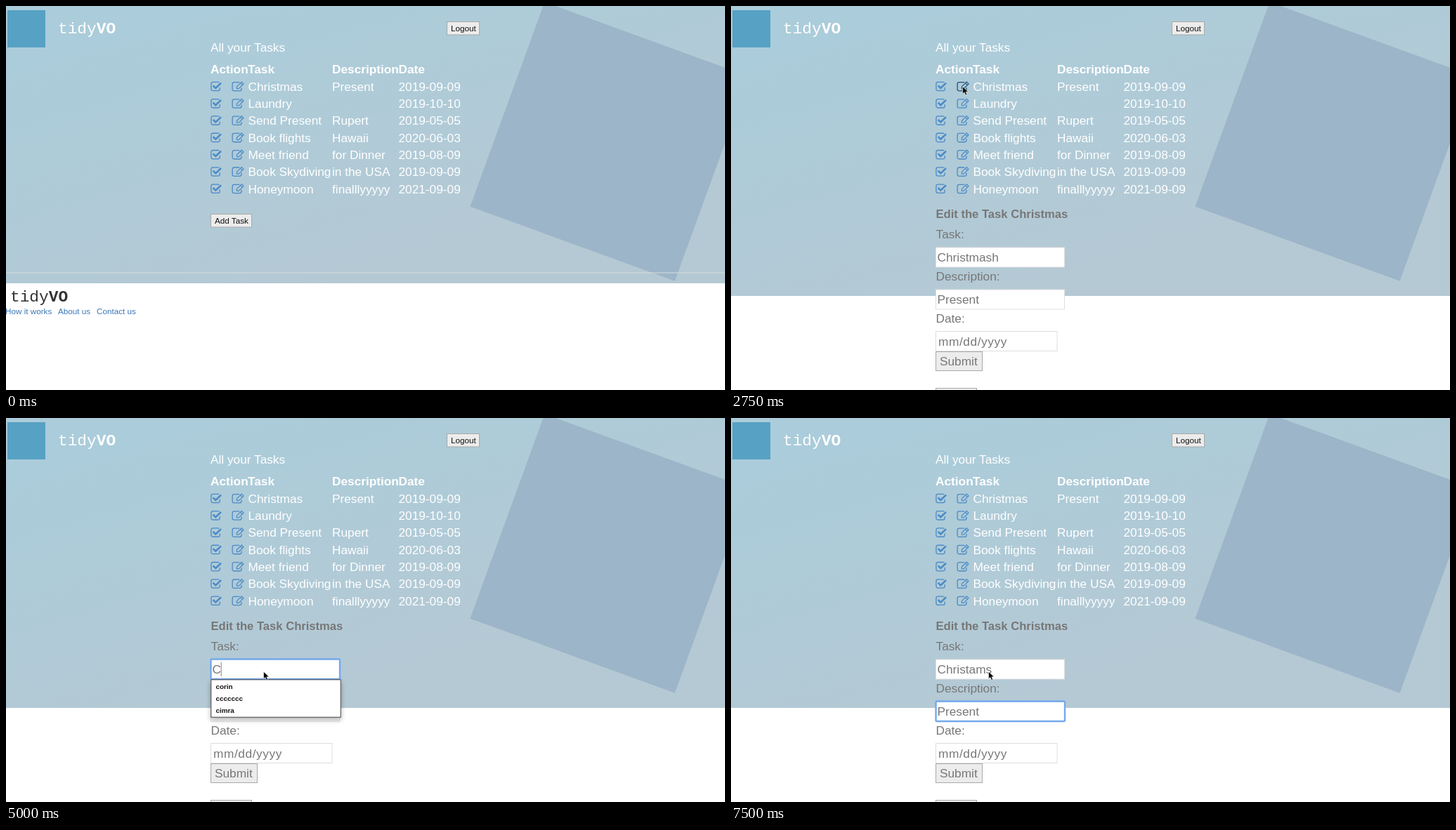
Write an HTML page that moves like this. It is 1023x547 px and loops after 8 s.

```html
<!DOCTYPE html>
<html lang="en">
<head>
<meta charset="utf-8">
<title>Task list</title>
<style>
html, body { margin: 0; width: 100%; height: 100%; overflow: hidden; background: #fff; }
svg { display: block; width: 100%; height: 100%; }
text { font: 17.25px "Liberation Sans", Arial, sans-serif; white-space: pre; }
.b { font-weight: bold; }
.brand { font: 22.8px "Liberation Mono", "Courier New", monospace; }
.small { font-size: 11.7px; }
.item { font-size: 9.9px; font-weight: bold; }
</style>
</head>
<body>
<svg id="stage" viewBox="0 0 1023 547" preserveAspectRatio="none">
  <defs>
    <linearGradient id="sky" gradientUnits="userSpaceOnUse" x1="330" y1="0" x2="450" y2="413">
      <stop offset="0" stop-color="#abccda"/>
      <stop offset="1" stop-color="#b5c9d4"/>
    </linearGradient>
    <filter id="shade" x="-10%" y="-20%" width="120%" height="150%">
      <feDropShadow dx="0" dy="3" stdDeviation="3.5" flood-opacity=".32"/>
    </filter>
  </defs>
</svg>
<script>
const NS = 'http://www.w3.org/2000/svg';
const LOOP = 8000;
const GRAY = '#777', LINK = '#3b78b8', ICON = '#4a8ac6', ICON_HOVER = '#23527c';
const stage = document.getElementById('stage');

function add(parent, tag, attrs = {}, content) {
  const el = document.createElementNS(NS, tag);
  for (const key in attrs) el.setAttribute(key, attrs[key]);
  if (content !== undefined) el.textContent = content;
  parent.appendChild(el);
  return el;
}
const label = (parent, x, y, s, fill = '#fff', cls = '') =>
  add(parent, 'text', { x, y, fill, class: cls }, s);
const box = (parent, x, y, width, height, fill, extra = {}) =>
  add(parent, 'rect', { x, y, width, height, fill, ...extra });
const show = (el, on) => el.setAttribute('visibility', on ? 'visible' : 'hidden');

function button(parent, x, y, w, h, s, fill = '#111', cls = 'small', dx = 5.5, dy = 13.4) {
  box(parent, x, y, w, h, '#ececec', { stroke: '#a9a9a9' });
  label(parent, x + dx, y + dy, s, fill, cls);
}

function brand(parent, x, y, fill) {
  const t = label(parent, x, y, 'tidy', fill, 'brand');
  add(t, 'tspan', { 'font-weight': 'bold' }, 'VO');
}

function field(parent, y, w) {
  box(parent, 291.5, y, w, 28, '#fff', { stroke: '#dedede' });
}

// page backdrop
const sky = box(stage, 0, 0, 1023, 395, 'url(#sky)');
box(stage, 704, 38, 310, 310, '#9db5c8', { transform: 'rotate(20 859 193)' });
box(stage, 2, 6, 54, 53, '#56a1c4');
brand(stage, 74, 38.5, '#fff');
button(stage, 627.5, 22.5, 46, 18.5, 'Logout');
label(stage, 291, 65.3, 'All your Tasks');

// task table
[[291, 'Action'], [344, 'Task'], [464, 'Description'], [558.5, 'Date']]
  .forEach(([x, s]) => label(stage, x, 96.3, s, '#fff', 'b'));

const tasks = [
  ['Christmas', 'Present', '2019-09-09'],
  ['Laundry', '', '2019-10-10'],
  ['Send Present', 'Rupert', '2019-05-05'],
  ['Book flights', 'Hawaii', '2020-06-03'],
  ['Meet friend', 'for Dinner', '2019-08-09'],
  ['Book Skydiving', 'in the USA', '2019-09-09'],
  ['Honeymoon', 'finalllyyyyy', '2021-09-09']
];
const pencils = tasks.map((row, i) => {
  const y = 120.9 + i * 24.28;
  const icon = (x, d, fine) => {
    const g = add(stage, 'g', { transform: `translate(${x} ${y - 14})`, fill: 'none', stroke: ICON });
    add(g, 'path', { d, 'stroke-width': 1.3 });
    add(g, 'path', fine);
    return g;
  };
  icon(291, 'M13.2 9V11.3Q13.2 13.8 10.7 13.8H3.4Q.9 13.8 .9 11.3V4Q.9 1.5 3.4 1.5H10.7Q11.6 1.5 12.3 1.9',
    { d: 'M3.6 6.4L7.3 10L15 2.7', 'stroke-width': 2.5 });
  const pencil = icon(321, 'M14 9.5V11.5Q14 14 11.5 14H3.6Q1.1 14 1.1 11.5V4.2Q1.1 1.7 3.6 1.7H11.2',
    { d: 'M7.4 8L14.2 1.2L17 4L10.2 10.8H7.4ZM12.4 3L15.2 5.8', 'stroke-width': 1.2 });
  [344.5, 464, 558.5].forEach((x, j) => label(stage, x, y, row[j]));
  return pencil;
});

// overview: add button and footer
const overview = add(stage, 'g');
button(overview, 291.5, 296.5, 58, 18.5, 'Add Task');
box(overview, 0, 379.5, 1023, 1, '#dadfdc');
brand(overview, 6, 421, '#333');
[[-1, 'How it works'], [74, 'About us'], [129, 'Contact us']]
  .forEach(([x, s]) => label(overview, x, 439, s, LINK, 'small'));

// edit form
const form = add(stage, 'g');
label(form, 291.5, 302, 'Edit the Task Christmas', GRAY, 'b').style.fontSize = '16.6px';
[['Task:', 331], ['Description:', 391], ['Date:', 451]]
  .forEach(([s, y]) => label(form, 291.5, y, s, GRAY));
field(form, 344, 183);
field(form, 404, 183);
field(form, 463.5, 172.5);
const entry = label(form, 293.5, 364.2, '', GRAY);
label(form, 293.5, 424.3, 'Present', GRAY);
label(form, 295, 484.3, 'mm/dd/yyyy', GRAY).style.letterSpacing = '.6px';
button(form, 291.5, 492.5, 66, 27, 'Submit', GRAY, '', 5.5, 19.7);
button(form, 291.5, 544.5, 58, 18.5, 'Add Task');
const focus = box(form, 291.5, 343.5, 183.5, 28.5, 'none', { rx: 1.5, stroke: '#73a9ee', 'stroke-width': 2.4 });
const caret = box(form, 0, 348, 1, 20, '#808080');

// suggestion list
const menu = add(form, 'g');
const panel = box(menu, 291.8, 372.8, 184.4, 104.5, '#fff', { stroke: '#454545', filter: 'url(#shade)' });
const items = Array.from({ length: 6 }, (_, i) => label(menu, 298.5, 385.8 + i * 17.12, '', '#111', 'item'));

const pointer = add(stage, 'path', {
  d: 'M0 0V10.4L2.4 8.2L4.1 12L6 11.2L4.4 7.5H7.8Z',
  fill: '#000', stroke: '#fff', 'stroke-width': .6
});

// timed steps: [start, ...values]
const pointerSteps = [
  [0, -50, -50], [750, 367, 173], [1000, 334, 147], [1250, 332, 125], [1500, 330, 114],
  [1750, 329.7, 114.8], [3250, 331, 160], [3500, 333, 325], [3750, 343, 372],
  [4000, 358, 372], [4250, 366.5, 366], [4500, 366.5, 361.3]
];
const entrySteps = [
  [0, 'Christmash'], [4750, 'C'], [5250, 'Ch'], [5500, 'Chri'],
  [5750, 'Christ'], [6000, 'Christam'], [6250, 'Christams']
];
const recent = ['hello', 'lkjhg', 'kjhg', ';lkjhg', 'test', 'lkjhgf'];
const matches = ['corin', 'ccccccc', 'cimra'];

const at = (steps, t) => steps.filter(s => s[0] <= t).pop();
const within = (t, a, b) => t >= a && t < b;

function draw(t) {
  const editing = t >= 2750;
  sky.setAttribute('height', editing ? 413 : 395);
  overview.style.display = editing ? 'none' : '';
  form.style.display = editing ? '' : 'none';

  const [, x, y] = at(pointerSteps, t);
  pointer.setAttribute('transform', `translate(${x} ${y})`);
  pencils[0].setAttribute('stroke', within(t, 2750, 3250) ? ICON_HOVER : ICON);
  pencils[1].setAttribute('stroke', within(t, 3250, 3500) ? ICON_HOVER : ICON);

  entry.textContent = at(entrySteps, t)[1];
  show(focus, t >= 4250);
  focus.setAttribute('y', t < 7000 ? 343.5 : 403.5);
  show(caret, within(t, 4250, 4750) || within(t, 5000, 6750));
  const typed = editing && t >= 4750 ? entry.getComputedTextLength() : 0;
  caret.setAttribute('x', 293.2 + typed);

  menu.style.display = within(t, 4250, 5250) ? '' : 'none';
  menu.setAttribute('opacity', t < 4500 ? .98 : 1);
  panel.setAttribute('height', t < 5000 ? 104.5 : 53.4);
  const words = t < 4750 ? recent : matches;
  items.forEach((el, i) => { el.textContent = words[i] || ''; });
}

const start = performance.now();
function tick() {
  draw((performance.now() - start) % LOOP);
  requestAnimationFrame(tick);
}
tick();
</script>
</body>
</html>
```
